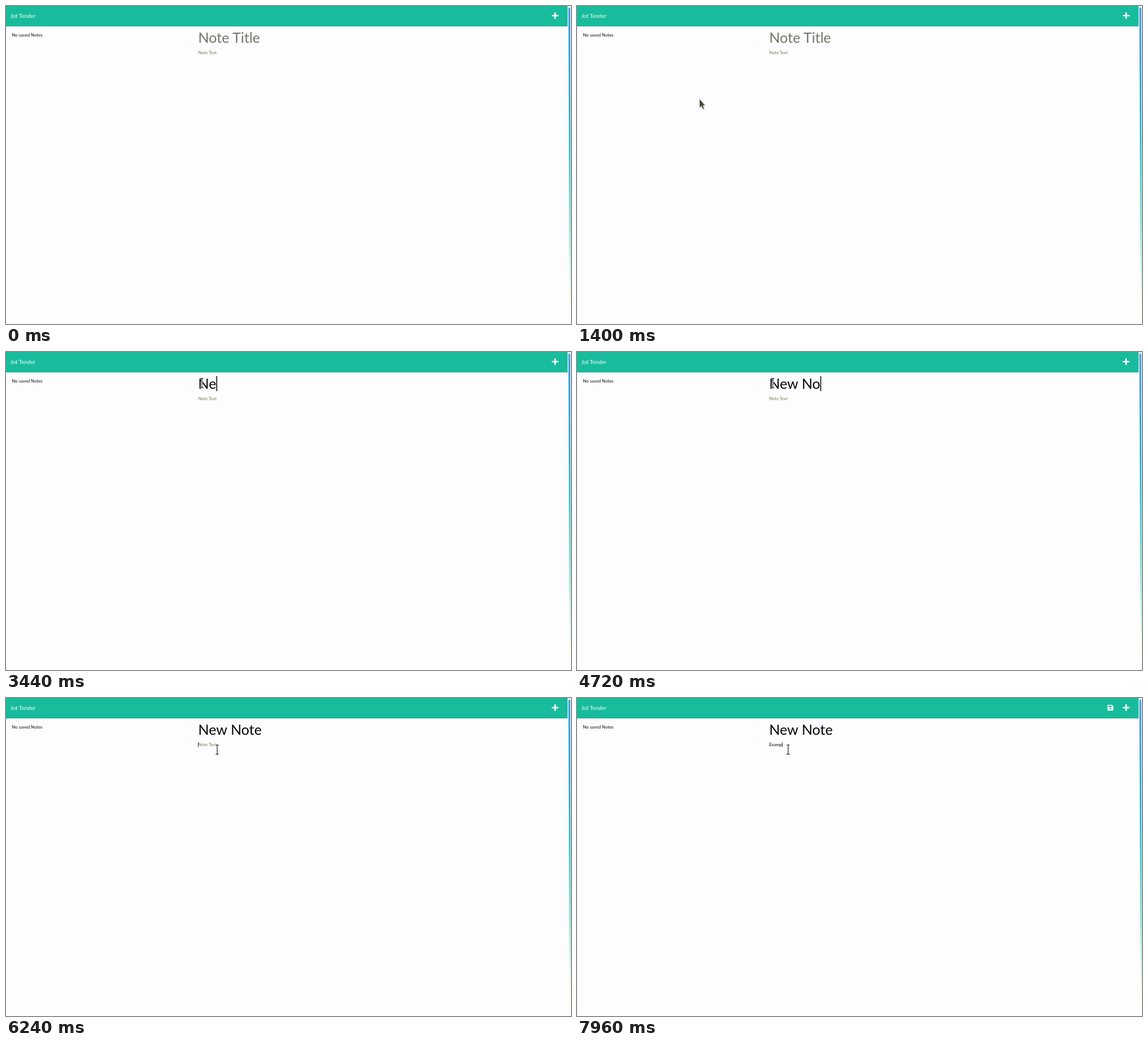
Write an HTML page that moves like this. It is 998 by 561 pixels and loops after 8000 ms.

```html
<!DOCTYPE html>
<html lang="en">
<head>
<meta charset="utf-8">
<title>Notes</title>
<style>
html, body { margin: 0; width: 100%; height: 100%; overflow: hidden; background: #fdfdff; }
svg { display: block; width: 998px; height: 561px; font-family: Lato, sans-serif; }
text { white-space: pre; }
</style>
</head>
<body>
<svg viewBox="0 0 998 561">
  <defs>
    <linearGradient id="bar" x1="0" y1="0" x2="0" y2="1">
      <stop offset="0" stop-color="#3b9be0"/>
      <stop offset=".3" stop-color="#2fa9dc"/>
      <stop offset=".48" stop-color="#25c0cf"/>
      <stop offset=".7" stop-color="#62ddcb"/>
      <stop offset=".88" stop-color="#c9f5e2"/>
      <stop offset="1" stop-color="#fdfde9"/>
    </linearGradient>
  </defs>
  <rect width="998" height="561" fill="#fdfdff"/>
  <rect y="36" width="1" height="525" fill="#f1f1ff"/>
  <rect x="322" y="36" width="1" height="525" fill="#fbfbee"/>
  <rect y="68" width="322" height="1" fill="#fbfbf0"/>
  <rect x="992" width="6" height="561" fill="#fdfdf8"/>
  <path d="M993.3 4Q995 1 996.7 4L997.6 530H995.6Z" fill="url(#bar)"/>
  <rect width="992" height="36" fill="#18bc9c"/>
  <rect y="35" width="992" height="1" fill="#16af91"/>
  <text x="7.8" y="21.2" font-size="9.7" fill="#f4fffc">Jot Tender</text>
  <path d="M970 12.2V21.8M965.2 17H974.8" stroke="#fff" stroke-width="2.6" stroke-linecap="round"/>
  <g id="save">
    <path d="M938.2 12H944.6L947.4 14.8V21Q947.4 22.2 946.2 22.2H938.2Q937 22.2 937 21V13.2Q937 12 938.2 12Z" fill="#fff"/>
    <path d="M938.5 13.5H944.2V16H938.5Z" fill="#18bc9c"/>
    <circle cx="942.2" cy="19" r="1.5" fill="#18bc9c"/>
  </g>
  <text x="10.5" y="54.3" font-size="7.75" fill="#111">No saved Notes</text>
  <text id="title" x="339.6" y="65" font-size="25"></text>
  <text id="body" x="339.4" y="84.6" font-size="7.7"></text>
  <rect id="caret" fill="#000"/>
  <g id="arrow">
    <path d="M1 1.5V17L4.6 14.2L7 19.5L9.4 18.2L7.2 13H11Z" fill="#000" opacity=".15"/>
    <path d="M0 0V15.6L3.4 12.8L6 18.2L8.2 17.1L5.9 11.8H10Z" fill="#444" stroke="#f3f3b0" stroke-width=".6"/>
  </g>
  <g id="beam" fill="none">
    <path id="beamLine" d="M-2.6 -8.4Q0 -8.4 0 -7V7Q0 8.4 -2.6 8.4M2.6 -8.4Q0 -8.4 0 -7M0 7Q0 8.4 2.6 8.4" stroke="#fff" stroke-width="2.8"/>
    <use href="#beamLine" id="beamInk"/>
    <path d="M-2.6 -8.4Q0 -8.4 0 -7V7Q0 8.4 -2.6 8.4M2.6 -8.4Q0 -8.4 0 -7M0 7Q0 8.4 2.6 8.4" stroke="#222" stroke-width="1.2"/>
  </g>
</svg>
<script>
const LOOP = 8000;
const el = id => document.getElementById(id);
const [save, title, body, caret, arrow, beam] =
  ['save', 'title', 'body', 'caret', 'arrow', 'beam'].map(el);
el('beamInk').remove();

const titleField = {
  node: title, text: 'New Note', hint: 'Note Title', hintColor: '#74746a',
  keys: [3080, 3440, 3640, 3840, 4320, 4480, 4760, 5000],
  x: 339.6, top: 42.5, height: 26.5, width: 1.5
};
const bodyField = {
  node: body, text: 'Examp', hint: 'Note Text', hintColor: '#7d7d4c',
  keys: [7080, 7280, 7440, 7640, 7920],
  x: 339.4, top: 78, height: 8.6, width: 0.8
};

// Pointer stops: time, x, y
const path = [
  [880, -12, 400], [1400, 216, 164], [1700, 338, 70], [2000, 383, 62],
  [2160, 383, 62], [2360, 346, 54.7], [5520, 346, 54.7], [6120, 373, 91]
];
const TITLE_CLICK = 1960, BODY_CLICK = 6160, BEAM_FROM = 1690;

function pointerAt(t) {
  const i = path.findIndex(p => p[0] > t);
  if (i < 0) return path[path.length - 1].slice(1);
  if (i === 0) return path[0].slice(1);
  const a = path[i - 1], b = path[i];
  let k = (t - a[0]) / (b[0] - a[0]);
  if (a[0] >= 2000) k = k * k * (3 - 2 * k);
  return [a[1] + (b[1] - a[1]) * k, a[2] + (b[2] - a[2]) * k];
}

function show(node, on) {
  node.setAttribute('display', on ? 'inline' : 'none');
}

function fill(f, t) {
  const n = f.keys.filter(k => k <= t).length;
  f.node.textContent = n ? f.text.slice(0, n) : f.hint;
  f.node.setAttribute('fill', n ? '#050505' : f.hintColor);
  return n;
}

function placeCaret(f, n) {
  const w = n ? f.node.getComputedTextLength() : 0;
  caret.setAttribute('x', f.x + w);
  caret.setAttribute('y', f.top);
  caret.setAttribute('width', f.width);
  caret.setAttribute('height', f.height);
}

function draw(t) {
  const titleCount = fill(titleField, t);
  const bodyCount = fill(bodyField, t);
  if (t >= BODY_CLICK) placeCaret(bodyField, bodyCount);
  else placeCaret(titleField, titleCount);
  show(caret, t >= TITLE_CLICK);
  show(save, bodyCount > 0);

  const [x, y] = pointerAt(t);
  show(arrow, t >= 880 && t < BEAM_FROM);
  show(beam, t >= BEAM_FROM);
  const move = `translate(${x} ${y})`;
  arrow.setAttribute('transform', move);
  beam.setAttribute('transform', move);
}

const start = performance.now();
function tick() {
  draw((performance.now() - start) % LOOP);
  requestAnimationFrame(tick);
}
draw(0);
requestAnimationFrame(tick);
</script>
</body>
</html>
```
